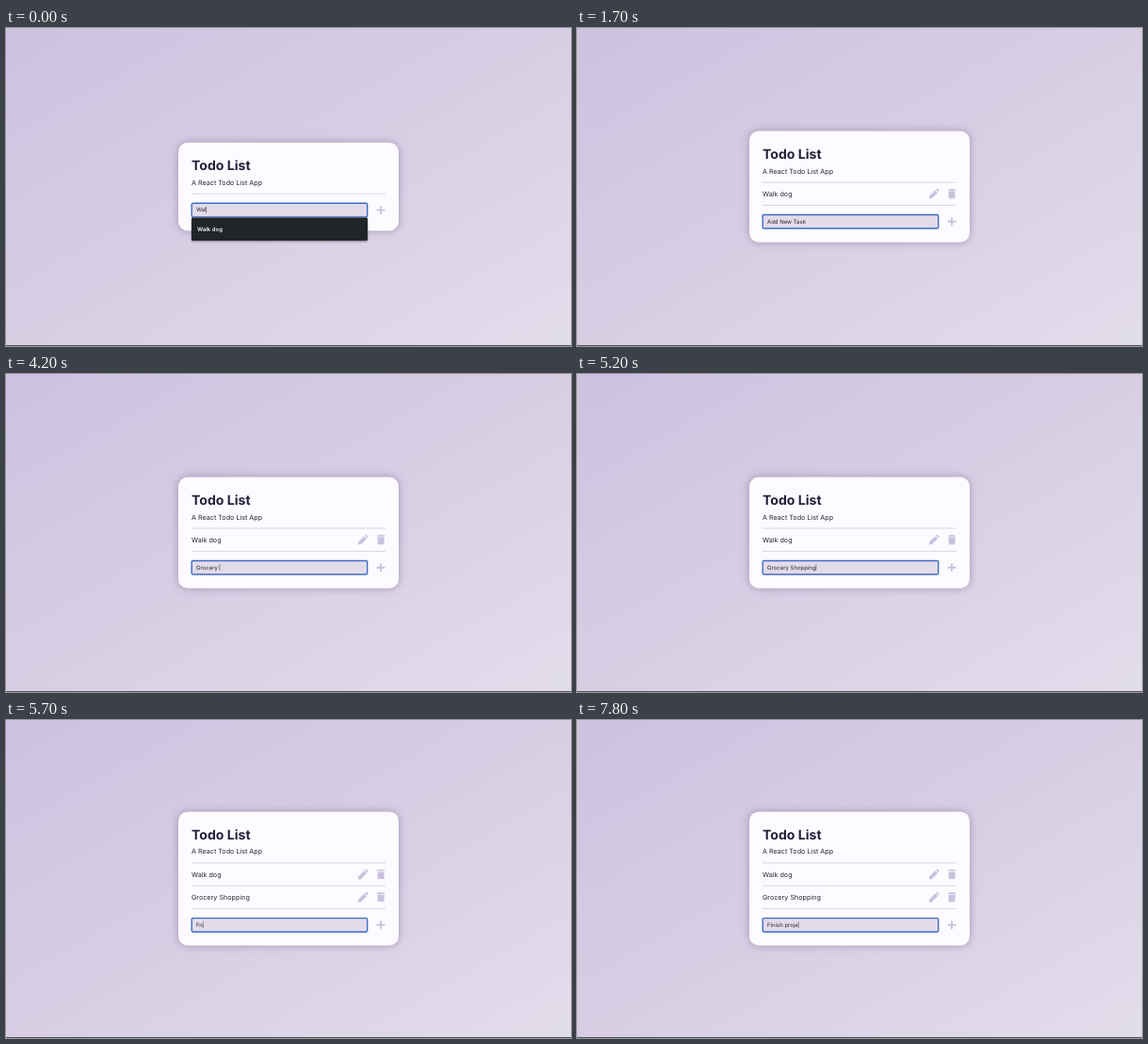
An HTML page that plays this animation: 600 by 338 pixels, repeating every 8 s.

```html
<!DOCTYPE html>
<html lang="en">
<head>
<meta charset="utf-8">
<title>Todo List</title>
<style>
  html, body { margin: 0; width: 100%; height: 100%; overflow: hidden; }
  body { background: linear-gradient(to bottom right, #ccc2e0, #d7cee4 50%, #e2ddeb); }
  svg { display: block; width: 100%; height: 100%; }
  text {
    font: 7.2px Inter, sans-serif; fill: #292533;
    white-space: pre; text-rendering: geometricPrecision;
  }
  .title { font-size: 14.1px; font-weight: 700; fill: #25203b; }
  .small { font-size: 6px; }
  .suggestion { font-weight: 600; fill: #f4f4f5; }
  .card { fill: #fdfbff; filter: drop-shadow(0 0 4px rgba(50, 35, 80, .34)); }
  .rule { stroke: #d9d5e2; stroke-width: 1; }
  .icon { fill: #c9c1df; }
  .field { fill: #e2dbea; stroke: #3f6cc4; stroke-width: 1.4; }
  .menu { fill: #222528; filter: drop-shadow(0 1px 1.2px rgba(0, 0, 0, .4)); }
</style>
</head>
<body>
<svg viewBox="0 0 600 338" preserveAspectRatio="none">
  <defs>
    <g id="row">
      <path class="icon" d="M374 17.3V14.7L380.3 8.4L383 11.1L376.7 17.3Z
        M381 7.7L381.8 6.9Q382.4 6.4 383 6.9L384.3 8.2Q384.9 8.8 384.3 9.5L383.6 10.3Z"/>
      <path class="icon" d="M394 7.4H396.2L396.8 6.8H399.4L400 7.4H402.2V8.7H394Z
        M394.6 9.5H401.6V16Q401.6 17.1 400.5 17.1H395.7Q394.6 17.1 394.6 16Z"/>
      <path class="rule" d="M197 24.3H403"/>
    </g>
  </defs>
  <rect id="card" class="card" x="183" width="234" rx="10"/>
  <g id="header">
    <text class="title" x="197" y="29.6">Todo List</text>
    <text x="197" y="45.1">A React Todo List App</text>
    <path class="rule" d="M197 54.5H403"/>
    <g class="task" transform="translate(0 54.5)">
      <use href="#row"/><text x="197" y="14.7">Walk dog</text>
    </g>
    <g class="task" transform="translate(0 78.8)">
      <use href="#row"/><text x="197" y="14.7">Grocery Shopping</text>
    </g>
  </g>
  <g id="form">
    <rect class="field" x="197.2" y=".7" width="186.5" height="14.6" rx="1.4"/>
    <text id="entry" class="small" x="202" y="9.9"></text>
    <rect id="caret" y="4.4" width=".6" height="6.9" fill="#4a4653"/>
    <path class="icon" d="M397.1 3.6H398.9V7.1H402.4V8.9H398.9V12.4H397.1V8.9H393.6V7.1H397.1Z"/>
    <g id="menu">
      <rect class="menu" x="197" y="16" width="187" height="24.5" rx="1.4"/>
      <text class="small suggestion" x="203" y="30.2">Walk dog</text>
    </g>
  </g>
  <rect y="337" width="600" height="1" fill="#55515d"/>
</svg>
<script>
const LOOP = 8000;
const ROW = 24.3;
const ADDED = [1400, 5400];
const MENU_CLOSES = 1100;
const $ = id => document.getElementById(id);
const tasks = document.querySelectorAll('.task');

// Each phrase is typed one letter per time; "<" deletes a letter.
const phrases = [
  { at: 0, start: 'Wal', keys: 'k dog', times: [100, 400, 700, 900, 1100] },
  { at: 1400, start: '', keys: 'Grocery Shopping',
    times: [2300, 2700, 3000, 3200, 3500, 3700, 3900, 4100,
            4400, 4500, 4700, 4800, 4850, 4900, 5000, 5200] },
  { at: 5400, start: '', keys: 'Fn<inish proje',
    times: [5600, 5700, 6000, 6100, 6200, 6300, 6400, 6500, 6800,
            7000, 7200, 7400, 7600, 7800] }
];

function typedText(t) {
  const phrase = phrases.filter(p => t >= p.at).pop();
  const pressed = phrase.times.filter(time => t >= time).length;
  return [...phrase.keys.slice(0, pressed)].reduce(
    (text, key) => key === '<' ? text.slice(0, -1) : text + key, phrase.start);
}

const show = (element, visible) => element.style.display = visible ? '' : 'none';

function draw(t) {
  const count = ADDED.filter(time => t >= time).length;
  const height = 93.8 + count * ROW;
  const top = 168.6 - height / 2;
  $('card').setAttribute('y', top);
  $('card').setAttribute('height', height);
  $('header').setAttribute('transform', `translate(0 ${top})`);
  $('form').setAttribute('transform', `translate(0 ${top + height - 29.9})`);
  tasks.forEach((task, i) => show(task, i < count));

  const text = typedText(t);
  $('entry').textContent = text || 'Add New Task';
  show($('caret'), text);
  $('caret').setAttribute('x', 202 + $('entry').getComputedTextLength());
  show($('menu'), t < MENU_CLOSES);
}

function tick() {
  draw(performance.now() % LOOP);
  requestAnimationFrame(tick);
}
tick();
</script>
</body>
</html>
```
